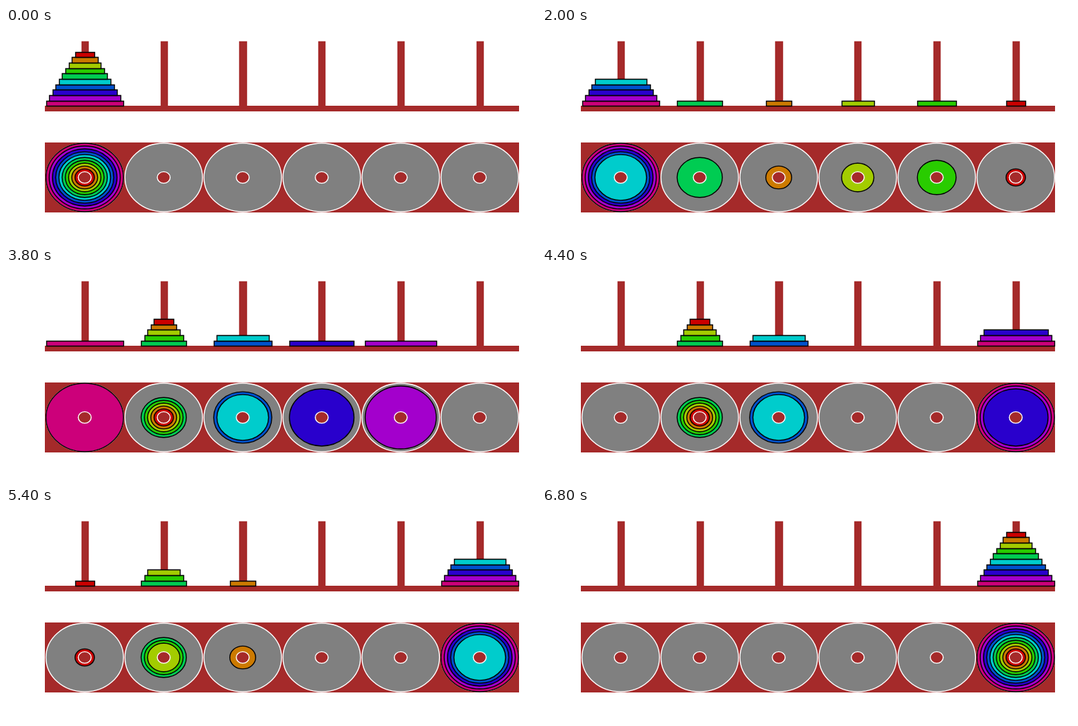
These frames come from a looping animation (750 by 300 pixels, 10000 ms). An HTML page with a canvas:

```html
<!DOCTYPE html>
<html lang="en">
<head>
<meta charset="utf-8">
<title>Tower of Hanoi, six pegs</title>
<style>
  html, body { margin: 0; width: 100%; height: 100%; overflow: hidden; background: #fff; }
  canvas { display: block; }
</style>
</head>
<body>
<canvas id="stage" width="750" height="300"></canvas>
<script>
const ctx = document.getElementById('stage').getContext('2d');

const DISKS = 10, PEGS = 6;
const LOOP = 10000, START = 1200, STEP = 200;
const WOOD = '#a52a2a';
const LEFT = 55, WIDTH = 671;
const UNIT = 4.57;           // half-width step between disks
const FLOOR = 110.15, THICK = 7.63;
const PLAN_Y = 211.5, RATIO = 0.885;

const pegX = i => 111.4 + 111.8 * i;
const diskR = d => UNIT * (d + 2);
const level = k => FLOOR - THICK * k;
const hue = d => `hsl(${36 * (d - 1)}, 100%, 40%)`;
const snap = v => Math.floor(v + 0.5) + 0.5;

// Frame-Stewart: park the top k disks on a spare peg, move the rest, restack.
function solve(n, from, to, spare) {
  if (n === 1) return [[from, to]];
  const k = n < spare.length + 2 ? 1 : n >> 1;
  const [park, ...rest] = spare;
  return [
    ...solve(k, from, park, [to, ...rest]),
    ...solve(n - k, from, to, rest),
    ...solve(k, park, to, [from, ...rest])
  ];
}

const moves = solve(DISKS, 0, PEGS - 1, [1, 2, 3, 4]);

function stacksAfter(count) {
  const stacks = Array.from({ length: PEGS }, () => []);
  for (let d = DISKS; d > 0; d--) stacks[0].push(d);
  for (const [from, to] of moves.slice(0, count)) stacks[to].push(stacks[from].pop());
  return stacks;
}

function paint(fill, line) {
  ctx.fillStyle = fill;
  ctx.strokeStyle = line;
  ctx.fill();
  ctx.stroke();
}

function box(x, half, top, bottom, fill, line) {
  const x0 = snap(x - half), y0 = snap(top);
  ctx.beginPath();
  ctx.rect(x0, y0, snap(x + half) - x0, snap(bottom) - y0);
  paint(fill, line);
}

function oval(x, r, fill, line) {
  ctx.beginPath();
  ctx.ellipse(x, PLAN_Y, r, r * RATIO, 0, 0, 2 * Math.PI);
  paint(fill, line);
}

function draw(count) {
  ctx.fillStyle = '#fff';
  ctx.fillRect(0, 0, 750, 300);
  ctx.lineWidth = 1.39;
  ctx.fillStyle = WOOD;
  ctx.fillRect(LEFT, 162, WIDTH, 99);

  const stacks = stacksAfter(count);
  stacks.forEach((_, i) => box(pegX(i), UNIT, level(12), FLOOR - 1, WOOD, WOOD));
  ctx.fillStyle = WOOD;
  ctx.fillRect(LEFT, 110, WIDTH, 8);

  stacks.forEach((stack, i) => {
    const x = pegX(i);
    oval(x, diskR(DISKS), '#808080', '#fff');
    stack.forEach((d, k) => {
      box(x, diskR(d), level(k + 1), level(k), hue(d), '#000');
      oval(x, diskR(d), hue(d), '#000');
    });
    oval(x, diskR(0), WOOD, '#fff');
  });
}

let shown = -1;
const begin = performance.now();

function tick() {
  const t = (performance.now() - begin) % LOOP;
  const count = Math.min(moves.length, Math.max(0, Math.floor((t - START) / STEP) + 1));
  if (count !== shown) draw(shown = count);
  requestAnimationFrame(tick);
}
tick();
</script>
</body>
</html>
```
